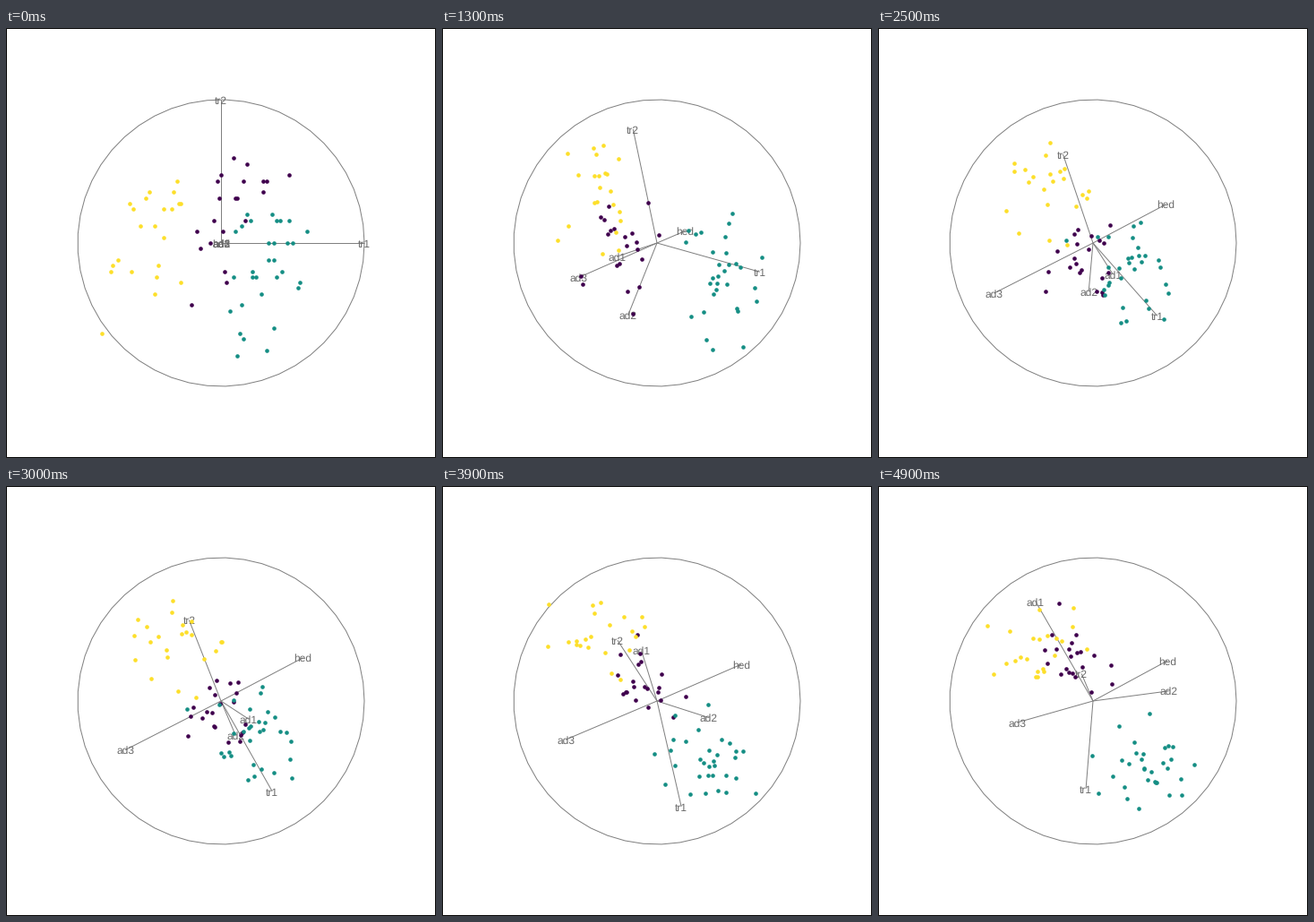
These frames come from a looping animation (480x480 px, 5000 ms). A matplotlib script:

```python
import numpy as np
import matplotlib.pyplot as plt
from matplotlib.animation import FuncAnimation

plt.rcParams["text.hinting"] = "none"

SIZE, DPI, RADIUS = 480, 72, 160
FRAMES, INTERVAL = 50, 100
GREY, TEXT_GREY = "#808080", "#6a6a6a"
LABELS = ["tr1", "tr2", "hed", "ad1", "ad2", "ad3"]

# Each cloud: colour, number of dots, centre along the six variables in pixels.
CLOUDS = [
    ("#3f004d", 21, (12, 36, 15, 68, 34, 34)),
    ("#158e84", 31, (49, -29, -24, -61, 40, -51)),
    ("#fddf2a", 22, (-80, 7, 20, 21, -89, 40)),
]
SPREAD = np.array([25, 45, 36, 29, 29, 25])
SIZE_LINK = np.array([0.7, 0.7, 0.65, 0.5, 0.15, 0.5])
GRID = 246 / np.array([120, 39, 15, 41, 8, 69])

# Waypoints of the tour: the tips of the six axes, in percent of the radius.
STOPS = np.array([0, 8, 18, 25, 35, 43, 49])
TIPS = np.array([
    [(100, 0), (0, 100), (0, 0), (0, 0), (0, 0), (0, 0)],
    [(86, -9), (-8, 90), (12, 5), (-23, -7), (-17, -37), (-38, -18)],
    [(58, -33), (-23, 70), (30, 14), (-22, -13), (-18, -54), (-66, -29)],
    [(45, -51), (-21, 62), (51, 27), (14, -22), (-3, -34), (-69, -35)],
    [(28, -73), (-26, 51), (60, 29), (11, 7), (25, -17), (-65, -30)],
    [(3, -67), (-23, 30), (55, 24), (-31, 59), (44, -4), (-60, -24)],
    [(-5, -61), (-8, 19), (52, 28), (-40, 69), (53, 7), (-53, -15)],
]) / 100
SLOPES = np.gradient(TIPS, STOPS, axis=0, edge_order=2)


def standard_noise(rng, shape):
    noise = np.clip(rng.normal(size=shape), -2.2, 2.2)
    return (noise - noise.mean(axis=0)) / noise.std(axis=0)


def make_cloud(count, centre, rng):
    """Dots that share a size factor, on the grid of whole measurements."""
    size = standard_noise(rng, (count, 1))
    own = standard_noise(rng, (count, len(LABELS)))
    shape = SIZE_LINK * size + np.sqrt(1 - SIZE_LINK**2) * own
    return np.round((centre + SPREAD * shape) / GRID) * GRID


def projection(frame):
    """Cubic path through the waypoints, kept orthonormal."""
    i = min(np.searchsorted(STOPS, frame, side="right") - 1, len(STOPS) - 2)
    step = STOPS[i + 1] - STOPS[i]
    t = (frame - STOPS[i]) / step
    ease = t * t * (3 - 2 * t)
    basis = ((1 - ease) * TIPS[i] + ease * TIPS[i + 1]
             + step * t * (1 - t) * ((1 - t) * SLOPES[i] - t * SLOPES[i + 1]))
    u, _, vt = np.linalg.svd(basis, full_matrices=False)
    return u @ vt


rng = np.random.default_rng(12)
clouds = [make_cloud(count, centre, rng) for _, count, centre in CLOUDS]

fig = plt.figure(figsize=(SIZE / DPI, SIZE / DPI), dpi=DPI, facecolor="white")
ax = fig.add_axes([0, 0, 1, 1])
ax.set(xlim=(-SIZE / 2, SIZE / 2), ylim=(-SIZE / 2, SIZE / 2))
ax.axis("off")

edge = SIZE / 2 - 0.5
ax.add_patch(plt.Rectangle((-edge, -edge), 2 * edge, 2 * edge,
                           fill=False, ec="black", lw=1, snap=False))
angle = np.linspace(0, 2 * np.pi, 50)
ax.plot(RADIUS * np.cos(angle), RADIUS * np.sin(angle), color=GREY, lw=1,
        solid_capstyle="butt")

spokes = [ax.plot([], [], color=GREY, lw=1, solid_capstyle="butt")[0] for _ in LABELS]
names = [ax.text(0, 0, label, family="Liberation Sans", fontsize=12, color=TEXT_GREY,
                 ha="center", va="baseline", zorder=3) for label in LABELS]
dots = [ax.plot([], [], "o", ms=4.6, mew=0, color=color, zorder=4)[0]
        for color, *_ in CLOUDS]


def update(frame):
    basis = projection(frame)
    for spoke, name, (x, y) in zip(spokes, names, basis * RADIUS):
        spoke.set_data([0, x], [0, y])
        name.set_position((x, y - 4.5))
    for dot, cloud in zip(dots, clouds):
        dot.set_data(*(cloud @ basis).T)
    return spokes + names + dots


anim = FuncAnimation(fig, update, frames=FRAMES, interval=INTERVAL, repeat=True, repeat_delay=0)
plt.show()
```
